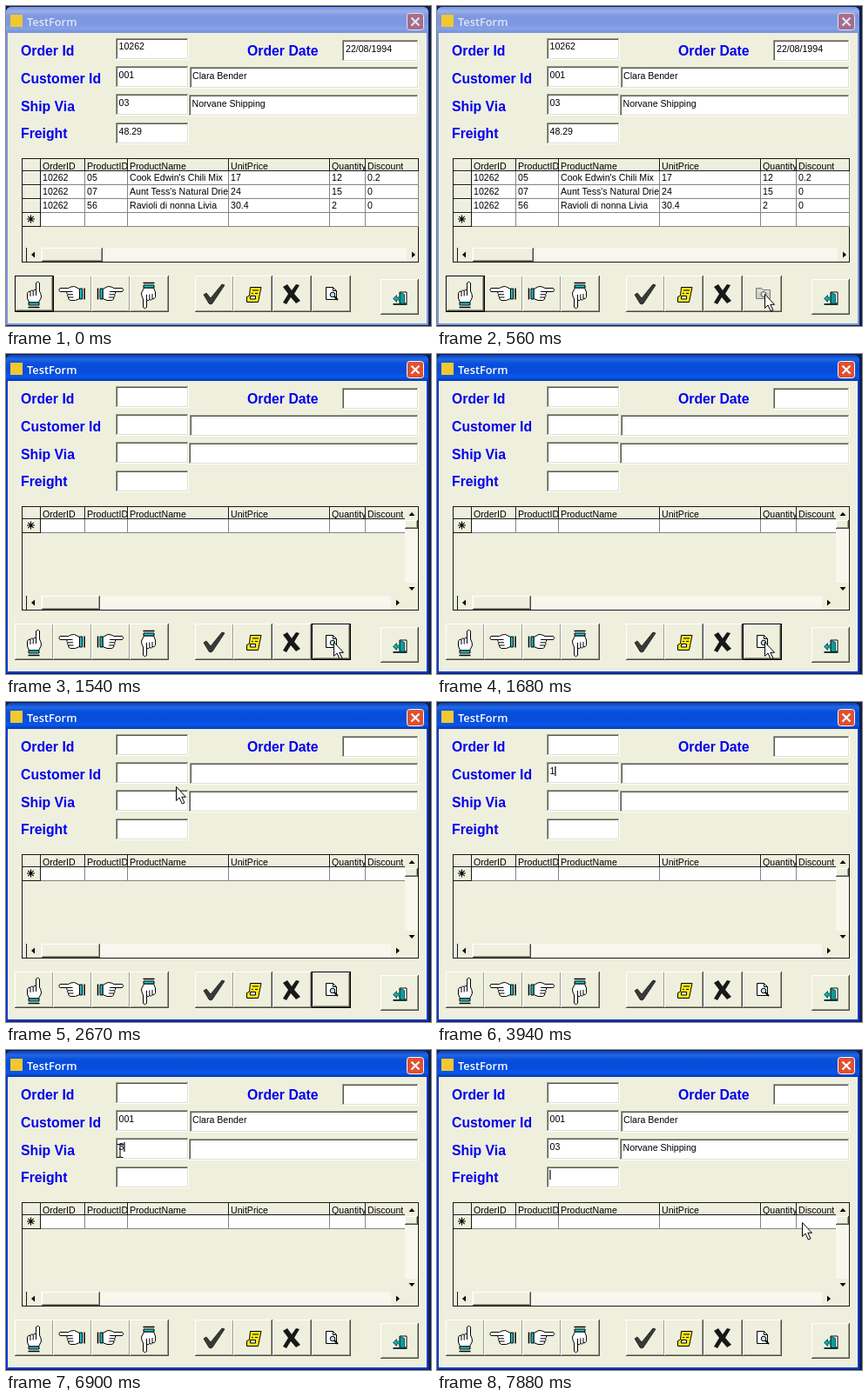
Write an HTML page that moves like this. It is 488 by 368 pixels and loops after 8 s.

```html
<!DOCTYPE html>
<html lang="en">
<head>
<meta charset="utf-8">
<title>TestForm</title>
<style>
html, body { margin: 0; width: 100%; height: 100%; overflow: hidden; background: #10204a; }
svg { display: block; }
#stage { width: 488px; height: 368px; }
rect { shape-rendering: crispEdges; }
text { font: 10.6px "Liberation Sans", sans-serif; white-space: pre; }
.label { font-size: 15.8px; font-weight: bold; fill: #0000ef; }
.title { font: 600 12.8px "Open Sans", sans-serif; }
.caret, .close { shape-rendering: auto; }
</style>
</head>
<body>
<svg id="stage" viewBox="0 0 488 368"></svg>
<script>
const LOOP = 8000;
const FACE = '#efefde';
const INK = '#181818';
const LINE = '#848484';
const stage = document.getElementById('stage');

const rect = (x, y, w, h, fill) => `<rect x="${x}" y="${y}" width="${w}" height="${h}" fill="${fill}"/>`;
const text = (x, y, s, cls = '') => `<text x="${x}" y="${y}" class="${cls}">${s}</text>`;
const path = (d, fill = 'none', stroke = '#000', width = 1) =>
  `<path d="${d}" fill="${fill}" stroke="${stroke}" stroke-width="${width}"/>`;
const at = (x, y, body, more = '') => `<g transform="translate(${x} ${y}) ${more}">${body}</g>`;
// Visible during the given "start-end" spans, in ms.
const during = (spans, body) => `<g data-on="${spans}">${body}</g>`;

// Two-pixel frame: light from the top left, shade at the bottom right.
function bevel(x, y, w, h, [outerTop, innerTop, innerBottom, outerBottom], fill) {
  return rect(x, y, w, h, outerBottom) + rect(x, y, w - 1, h - 1, outerTop) +
    rect(x + 1, y + 1, w - 2, h - 2, innerBottom) + rect(x + 1, y + 1, w - 3, h - 3, innerTop) +
    rect(x + 2, y + 2, w - 4, h - 4, fill);
}
const field = (x, y, w) => bevel(x, y, w, 25, ['#9c9c8c', '#5a5a52', '#dedece', '#fff'], '#fff');
const raised = (x, y, w, h) => bevel(x, y, w, h, ['#fff', FACE, '#9c9c8c', '#4a4a42'], FACE);
const caret = (x, y) => `<rect class="caret" x="${x + .3}" y="${y}" width="1.2" height="11"/>`;

function gradient(id, colors) {
  const stops = colors.map((c, i) => `<stop offset="${i / (colors.length - 1)}" stop-color="${c}"/>`);
  return `<linearGradient id="${id}" x2="0" y2="1">${stops.join('')}</linearGradient>`;
}

function titleBar(id, { border, bar, ink, close }) {
  return gradient(id, bar) +
    path('M0 367V8Q0 1 7 1H478Q485 1 485 8V367Z', border, 'none') +
    path('M0 31V8Q0 1 7 1H478Q485 1 485 8V31Z', `url(#${id})`, 'none') +
    `<g fill="${ink}">${text(24, 22.5, 'TestForm', 'title')}</g>` +
    `<rect class="close" x="460.5" y="8.5" width="19" height="19" rx="3" fill="${close}" stroke="${ink}"/>` +
    path('M465.500 13.500l9 9m0-9l-9 9', 'none', ink, 2.2);
}

function windowFrame() {
  const inactive = {
    border: '#7b96de', bar: ['#7a94dc', '#9ab0ea', '#7f99e0', '#7d98e0', '#7d98e0', '#86a2e8', '#7890d4'],
    ink: '#dee7f8', close: '#a86c88'
  };
  const active = {
    border: '#0838d8', bar: ['#0c40b8', '#2268e4', '#0850dc', '#084cd8', '#084cdc', '#0858ec', '#0838b4'],
    ink: '#fff', close: '#e05030'
  };
  return during('0-980', titleBar('dim', inactive)) + during('980-8000', titleBar('lit', active)) +
    rect(2, 31, 481, 334, FACE) + rect(5, 10, 14, 14, '#f0c830');
}

function form() {
  const labels = [[17, 57, 'Order Id'], [17, 89, 'Customer Id'], [17, 121, 'Ship Via'],
    [17, 152, 'Freight'], [277, 57, 'Order Date']];
  const fields = [[126, 37, 84], [126, 69, 84], [126, 101, 84], [126, 134, 84],
    [211, 70, 263], [210, 102, 264], [386, 39, 88]];
  return labels.map(l => text(...l, 'label')).join('') + fields.map(f => field(...f)).join('');
}

function values() {
  const customer = text(129.5, 83, '001') + text(214, 84, 'Clara Bender');
  const shipper = text(129.5, 115, '03') + text(213.5, 116, 'Norvane Shipping');
  return during('0-1400', text(129.5, 50, '10262') + text(390, 53, '22/08/1994') + text(129.5, 148, '48.29')) +
    during('0-1400 4650-8000', customer) +
    during('0-1400 7600-8000', shipper) +
    during('3940-4650', text(129.5, 83, '1')) +
    during('6620-7600', text(129.5, 115, '3')) +
    during('2950-3660', caret(129, 74)) +
    during('3940-4650', caret(135, 74)) +
    during('4790-5770 6340-6620', caret(129, 106)) +
    during('6620-7320', caret(135, 106)) +
    during('7740-8000', caret(129, 138));
}

const triangle = (x, y, turn) => at(x, y, path('M-3.5 2H3.5L0-2Z', '#000', 'none'), `rotate(${turn})`);
const star = y => path(`M28.5 ${y - 4.5}v9m-4.5-4.5h9m-7.7-3.2l6.4 6.4m0-6.4l-6.4 6.4`, 'none', '#000', 1.1);

function grid(rows, right) {
  const columns = [39, 90, 139, 255, 371, 412, right];
  const header = ['OrderID', 'ProductID', 'ProductName', 'UnitPrice', 'Quantity', 'Discount'];
  const lineY = i => 189 + i * 16;
  const bottom = lineY(rows.length + 1);
  const cells = (row, y) => row.map((s, i) =>
    `<svg x="${columns[i] + 1}" y="${y}" width="${columns[i + 1] - columns[i] - 1}" height="16">${text(2, 12, s)}</svg>`).join('');

  let out = rect(18, 175, 456, 120, INK) + rect(19, 176, 454, 118, FACE) +
    rect(40, 190, right - 40, bottom - 190, '#fff');
  for (let i = 0; i <= rows.length + 1; i++) {
    out += rect(19, lineY(i), 20, 1, INK) + rect(39, lineY(i), right - 39, 1, i ? LINE : INK);
    if (i <= rows.length) out += rect(19, lineY(i) + 1, 20, 1, '#fff');
  }
  for (const x of columns) {
    out += rect(x, 190, 1, bottom - 189, x === 39 ? INK : LINE) + rect(x, 176, 1, 14, INK);
    if (x < right) out += rect(x + 1, 176, 1, 13, '#fff');
  }
  out += cells(header, 176);
  rows.forEach((row, i) => out += cells(row, lineY(i)));
  return out + star(lineY(rows.length) + 8);
}

// The bar may run past the grid edge, where it is cut off.
function scrollX(right, thumb) {
  const bar = rect(23, 278, right - 23, 16, '#f7f7ee') + rect(23, 278, 17, 16, FACE) + rect(23, 278, 1, 16, INK) +
    rect(right - 16, 278, 16, 16, FACE) + raised(41, 278, thumb, 16) + triangle(31, 286, -90) + triangle(right - 8, 286, 90);
  return `<svg width="473" height="294">${bar}</svg>`;
}

function scrollY() {
  return rect(458, 176, 15, 102, '#f7f7ee') + rect(458, 176, 15, 15, FACE) + raised(458, 191, 15, 10) +
    rect(458, 263, 15, 15, FACE) + triangle(466, 184, 0) + triangle(466, 270, 180);
}

function tables() {
  const rows = [
    ['10262', '05', "Cook Edwin's Chili Mix", '17', '12', '0.2'],
    ['10262', '07', "Aunt Tess's Natural Dried", '24', '15', '0'],
    ['10262', '56', 'Ravioli di nonna Livia', '30.4', '2', '0']];
  return during('0-1540', grid(rows, 473) + scrollX(476, 70)) +
    during('1540-8000', grid([], 458) + scrollX(458, 67) + scrollY());
}

function toolbar() {
  const button = x => raised(x, 310, 45, 42);
  const focus = x => rect(x, 310, 45, 42, '#000') + raised(x + 1, 311, 43, 40);
  const hand = path('M-4-7H-13.5q-2.5 2 0 4H-5q-2 1.7 .5 3.3q-1.5 2 .8 3.2q-1 2.300 2 3.500H4L9 5V-6L3-9Q-1-9-4-7z', '#fff') +
    path('M-5-3H1M-4.500 .3H1.500M-3.700 3.500H2') +
    path('M9-6.500h3V5.500H9z', '#18c8d0') + path('M14.500-7V6', 'none', '#000', 1.5);
  const check = path('M227 332l3-2 5 6 13-16 3 1-14 21q-2 2-4 0z', '#393939', '#181818', .8);
  const note = path('M280.500 323.500H293L289.500 340.500H276.500V334.500L279.500 333z', '#f8e818') +
    path('M283 327h7M282 330.500h2M286 330.500h3') + path('M280.500 333.500h6v3.500h-6z', '#fff');
  const cross = path('M318 323l5-3 5 7 5-7 4 1-6 10 7 8-5 3-6-7-5 8-4-2 6-10z', '#181818', 'none');
  const page = path('M367.500 323.500h8l4 4v10h-12z', '#fff') + path('M375.500 323.500v4h4') +
    '<circle cx="375" cy="332" r="2.800" fill="#b8e4e4" stroke="#000"/>' + path('M377 334l4 4', 'none', '#000', 1.8);
  const folder = path('M366.500 336.500v-12h6l2 2h8v10z', '#d0d0c4', '#7b7b73') + path('M368 328h13', 'none', '#fff') +
    '<circle cx="375" cy="331.500" r="3" fill="#d4ecee" stroke="#525252"/>' + path('M377 334l4 4', 'none', '#424242', 1.6);
  const door = path('M450.500 327.500h8v13h-8z', '#fff') + path('M451 328l5 2v12l-5-2z', '#109c9c', '#003838', .8) +
    path('M443 341.500h16', 'none', '#083838', 2) + path('M443 335l4-4v2.500h4v3h-4v2.500z', '#18a8a8', '#004848', .8);

  return [10, 54, 98, 142, 217, 261, 306, 351].map(button).join('') + raised(430, 314, 44, 41) +
    during('0-1260', focus(10)) + during('1260-2950', focus(351)) +
    at(31.5, 332, hand, 'rotate(90)') + at(75.5, 331.5, hand) +
    at(120, 331.5, hand, 'scale(-1 1)') + at(164.5, 333, hand, 'rotate(-90)') +
    check + note + cross + at(1.5, 1.5, door) +
    during('0-280 1540-8000', page) + during('280-1540', folder);
}

const shapes = {
  arrow: path('M.5.5V16.500L4 13l3.300 7 2.700-1.200-3.200-6.500H11.500Z', '#fff'),
  beam: path('M-3.500-7.500h2.500l1 1 1-1h2.500M0-7V7M-3.500 7.500h2.500l1-1 1 1h2.500', 'none', '#101010', 1.1)
};
const pointer = [
  [0], [280, 'arrow', 381, 344], [420, 'arrow', 378, 337], [560, 'arrow', 376, 331],
  [2250, 'arrow', 358, 300], [2390, 'arrow', 300, 225], [2530, 'arrow', 235, 150],
  [2670, 'arrow', 195, 97], [2810, 'beam', 168, 84], [2950, 'beam', 162, 82], [3940],
  [5210, 'beam', 129, 102], [5350, 'beam', 129.5, 111], [6620], [6900, 'beam', 131, 116],
  [7600, 'arrow', 190, 150], [7740, 'arrow', 330, 190], [7880, 'arrow', 419, 198]
];

stage.innerHTML = windowFrame() + form() + values() + tables() + toolbar() +
  Object.entries(shapes).map(([name, body]) => `<g id="${name}">${body}</g>`).join('');

const timed = [...stage.querySelectorAll('[data-on]')].map(el => ({
  el, spans: el.dataset.on.split(' ').map(s => s.split('-').map(Number))
}));
const cursors = Object.keys(shapes).map(id => document.getElementById(id));
const show = (el, on) => { el.style.display = on ? '' : 'none'; };

function render(t) {
  for (const { el, spans } of timed) show(el, spans.some(([from, to]) => t >= from && t < to));
  const [, shape, x, y] = pointer.findLast(([from]) => t >= from);
  for (const el of cursors) {
    show(el, el.id === shape);
    if (el.id === shape) el.setAttribute('transform', `translate(${x} ${y})`);
  }
}

const start = performance.now();
function tick() {
  render((performance.now() - start) % LOOP);
  requestAnimationFrame(tick);
}
tick();
</script>
</body>
</html>
```
